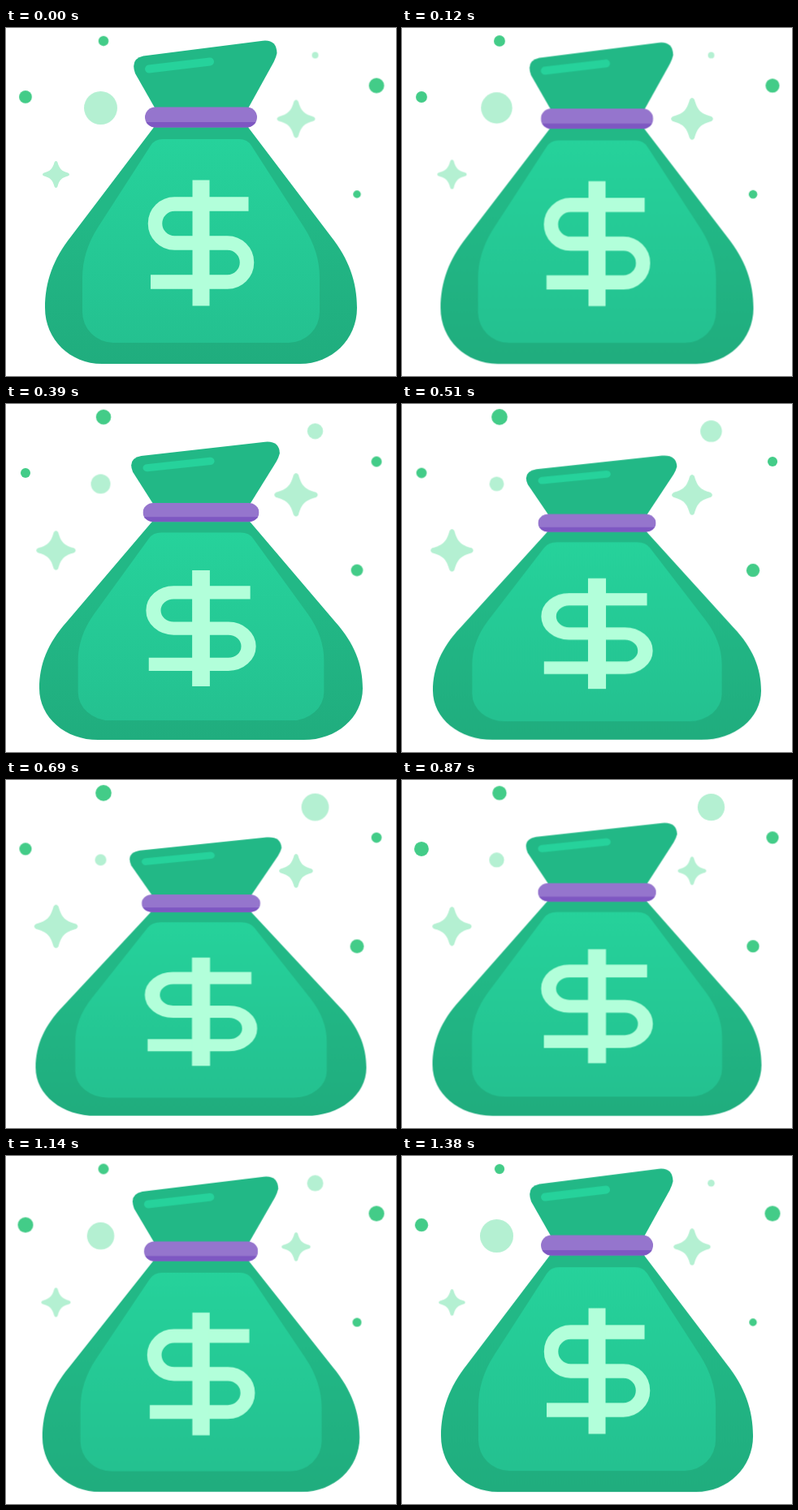
An HTML page for the animation above (1410 ms loop, 480 px wide and 429 px high).

```html
<!DOCTYPE html>
<html lang="en">
<head>
<meta charset="utf-8">
<title>Money bag</title>
<style>
  html, body { margin: 0; width: 100%; height: 100%; overflow: hidden; background: #fff; }
  svg { display: block; width: 100%; height: 100%; }
  .bag { transform-origin: 240px 414px; animation: squash 1410ms infinite; }
  .girth {
    transform-origin: 240px 414px;
    animation: widen 705ms cubic-bezier(.5, 0, .5, 1) infinite alternate;
  }
  @keyframes squash {
    0% { transform: scaleY(1); animation-timing-function: cubic-bezier(.55, 0, .62, 1); }
    46.8% { transform: scaleY(.86); animation-timing-function: cubic-bezier(.2, 0, .5, 1); }
    100% { transform: scaleY(1); }
  }
  @keyframes widen {
    from { transform: scaleX(1); }
    to { transform: scaleX(1.06); }
  }
  .pulse { animation: pulse 705ms cubic-bezier(.37, 0, .63, 1) var(--d) infinite alternate; }
  @keyframes pulse {
    from { transform: scale(var(--lo)); }
    to { transform: scale(var(--hi)); }
  }
  .dark { fill: #43cc88; }
  .pale { fill: #b4f0d2; }
</style>
</head>
<body>
<svg viewBox="0 0 480 429">
  <defs>
    <linearGradient id="skin" gradientUnits="userSpaceOnUse" x1="0" y1="230" x2="0" y2="414">
      <stop offset="0" stop-color="#22b886"/>
      <stop offset="1" stop-color="#20ad7e"/>
    </linearGradient>
    <linearGradient id="panel" gradientUnits="userSpaceOnUse" x1="0" y1="137" x2="0" y2="388">
      <stop offset="0" stop-color="#26d29b"/>
      <stop offset="1" stop-color="#24c190"/>
    </linearGradient>
    <clipPath id="band"><rect x="171" y="97.500" width="138" height="25" rx="12.5"/></clipPath>
    <path id="star" d="M-3-25Q0-29 3-25C7-11 11-7 25-3Q29 0 25 3C11 7 7 11 3 25Q0 29-3 25C-7 11-11 7-25 3Q-29 0-25-3C-11-7-7-11-3-25Z"/>
  </defs>

  <!-- dots: unit circles scaled to their radius -->
  <g class="dark">
    <g transform="translate(120 16)"><circle class="pulse" r="1" style="--lo:6;--hi:10;--d:-105ms"/></g>
    <g transform="translate(24 85)"><circle class="pulse" r="1" style="--lo:6;--hi:9.6;--d:-1045ms"/></g>
    <g transform="translate(456 71)"><circle class="pulse" r="1" style="--lo:6;--hi:9.8;--d:-855ms"/></g>
    <g transform="translate(432 205)"><circle class="pulse" r="1" style="--lo:4.7;--hi:8.5;--d:-55ms"/></g>
  </g>
  <g class="pale">
    <g transform="translate(116.5 98.5)"><circle class="pulse" r="1" style="--lo:7;--hi:20.5;--d:-725ms"/></g>
    <g transform="translate(380.5 33.5)"><circle class="pulse" r="1" style="--lo:3.7;--hi:17.3;--d:-1345ms"/></g>
    <g transform="translate(357 112)"><use class="pulse" href="#star" style="--lo:.62;--hi:1.01;--d:-415ms"/></g>
    <g transform="translate(61.5 180.5)"><use class="pulse" href="#star" style="--lo:.6;--hi:1;--d:-75ms"/></g>
  </g>

  <g class="bag"><g class="girth">
    <path fill="url(#skin)" d="M184 100L159 56Q152.500 38 169 34.500L316 15.700Q333 14 333.500 31Q332.500 36 329.500 42L297.500 100Z"/>
    <path fill="url(#skin)" d="M183 121L80 257C58 285 48 313 48 345C48 384 79 414 118 414H362C401 414 432 384 432 345C432 313 422 285 400 257L297 121Z"/>
    <path fill="url(#panel)" d="M193 137H287Q297 137 302 145L367 246Q386 276 386 308V350A38 38 0 0 1 348 388H132A38 38 0 0 1 94 350V308Q94 276 113 246L178 145Q183 137 193 137Z"/>
    <path stroke="#26d29b" stroke-width="10" stroke-linecap="round" d="M176 50.500L251 41.500"/>
    <g clip-path="url(#band)">
      <path fill="#9575cd" d="M171 97h138v27h-138z"/>
      <path fill="#7e57c2" d="M171 116h138v7h-138z"/>
    </g>
    <path fill="none" stroke="#b2ffda" stroke-width="17.500" d="M298.500 217H207.500A24 24 0 0 0 207.500 265H272.500A24 24 0 0 1 272.500 313H178"/>
    <path fill="#b2ffda" d="M229.500 187.500h21v155h-21z"/>
  </g></g>
</svg>
</body>
</html>
```
